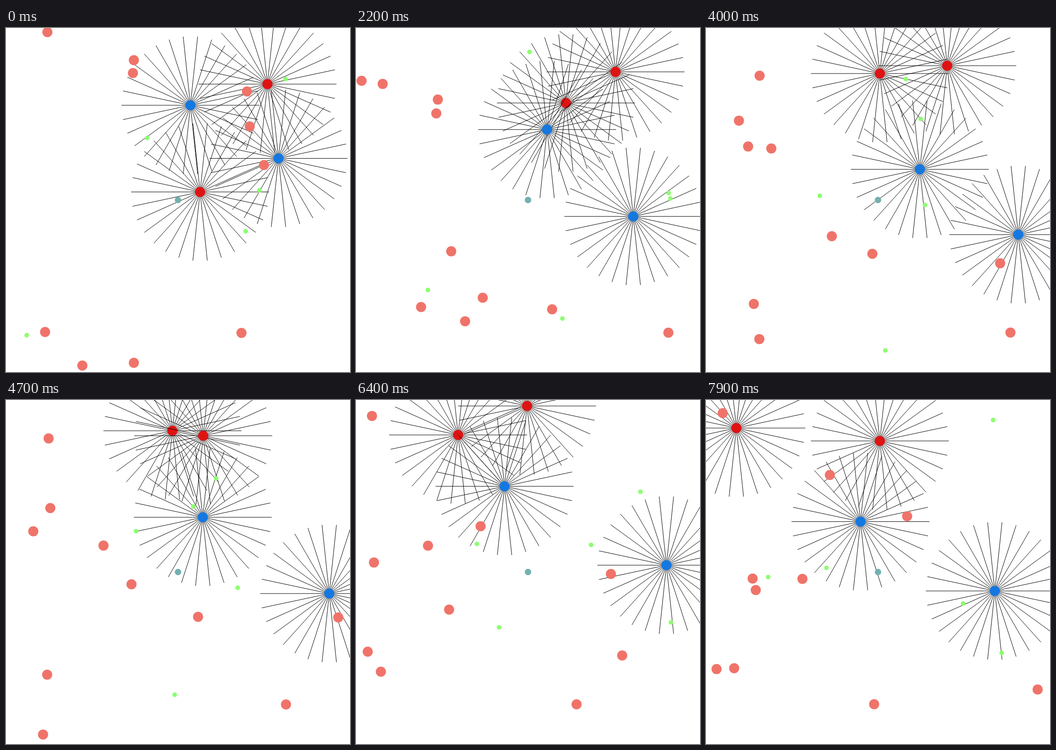
An HTML page with a canvas for the animation above (8000 ms loop, 748x748 px).

```html
<!DOCTYPE html>
<html lang="en">
<head>
<meta charset="utf-8">
<title>Drifting dots</title>
<style>
  html, body { margin: 0; width: 100%; height: 100%; overflow: hidden; background: #fff; }
  canvas { display: block; }
</style>
</head>
<body>
<canvas id="stage" width="748" height="748"></canvas>
<script>
const SIZE = 748, MID = SIZE / 2, STEP = 100, STEPS = 80, SUB = 8;
const RED = '#df1313', BLUE = '#1478e0', TEAL = '#74b0b0';
const PINK = { r: 11, fill: '#f07369', lo: 10, hi: 739 };
const GREEN = { r: 5, fill: '#8cff70', lo: 5, hi: 744 };
const SHIELD = 74; // unseen round wall about the teal dot
const ctx = document.getElementById('stage').getContext('2d');

// Stars glide through a few points, all at the same steps
const KEYS = [0, 14, 30, 40, 55, 64, 79];
const stars = [
  { fill: RED, x: [422, 458, 440, 378, 356, 372, 378], y: [356.5, 224.5, 114.5, 99, 29, 13, 89] },
  { fill: RED, x: [568.5, 549.5, 574.5, 524.5, 310, 222, 66], y: [122, 98, 94, 82, 75, 76, 61] },
  { fill: BLUE, x: [401, 361, 476, 465, 377, 323, 336], y: [168, 146, 302.5, 307.3, 191.5, 187.7, 264.4] },
  { fill: BLUE, x: [592.5, 566.5, 649, 679, 719, 675, 628], y: [283.5, 321.5, 490, 449.3, 389.4, 359.2, 415.2] }
];

// Hermite curve with averaged slopes at the points
function glide(values, t) {
  const last = KEYS.length - 1;
  let i = 0;
  while (i < last - 1 && KEYS[i + 1] <= t) i++;
  const slope = k => {
    const a = Math.max(k - 1, 0), b = Math.min(k + 1, last);
    return (values[b] - values[a]) / (KEYS[b] - KEYS[a]);
  };
  const span = KEYS[i + 1] - KEYS[i], u = (t - KEYS[i]) / span, w = 1 - u;
  return values[i] * (1 + 2 * u) * w * w + values[i + 1] * (1 + 2 * w) * u * u +
    span * u * w * (slope(i) * w - slope(i + 1) * u);
}

function bounce(p, v, lo, hi) {
  if (p < lo && v < 0) return [2 * lo - p, -v];
  if (p > hi && v > 0) return [2 * hi - p, -v];
  return [p, v];
}

// Moves a dot in small steps off the walls and the shield, noting its place at each step
const dots = [];
function launch(kind, x, y, vx, vy, from = 0, to = STEPS) {
  const track = [];
  for (let i = 0; i < (to - from) * SUB; i++) {
    if (i % SUB === 0) track.push([x, y]);
    [x, vx] = bounce(x + vx / SUB, vx, kind.lo, kind.hi);
    [y, vy] = bounce(y + vy / SUB, vy, kind.lo, kind.hi);
    const d = Math.hypot(x - MID, y - MID), nx = (x - MID) / d, ny = (y - MID) / d;
    const inward = vx * nx + vy * ny;
    if (d < SHIELD + kind.r && inward < 0) {
      vx -= 2 * inward * nx;
      vy -= 2 * inward * ny;
    }
  }
  dots.push({ kind, track, from });
}

launch(GREEN, 45, 668, 5.06, 11.38, 0, 58);
launch(GREEN, 521, 442, -3.28, 8.62);
launch(GREEN, 307, 239, 3.19, -8.5);
launch(GREEN, 608, 111, 3.27, 11.27, 0, 34);
launch(GREEN, 551, 353, 11.52, .8);
launch(PINK, 512, 663, 7.6, -.02);
launch(PINK, 278, 728, -.11, 7.43);
launch(PINK, 166, 734, 11.84, -5.56);
launch(PINK, 85, 661, 6.92, 8.15);
launch(PINK, 278, 70, -10, -7.8);
launch(PINK, 90, 9, -3.54, 4.81);
launch(PINK, 276, 98, -4.61, 3.99);
launch(PINK, 524, 138, 1, -6, 0, 17);
launch(PINK, 530, 214, 0, 0, 0, 3);
launch(PINK, 561, 298, 0, 0, 0, 6);

// Eaten dots come back elsewhere
launch(GREEN, 616, 262, .4, -10.4, 58);
launch(GREEN, 518, 169, -8.51, 4.8, 34);
launch(PINK, 195, 170, -3.41, -2.88, 17);
launch(PINK, 181, 614, -2.08, -.38, 3);
launch(PINK, 288, 316, -5.06, 10.6, 6);

const rays = new Path2D();
for (let i = 0; i < 30; i++) {
  const a = i * Math.PI / 15;
  rays.moveTo(0, 0);
  rays.lineTo(150 * Math.cos(a), 150 * Math.sin(a));
}

function disc(x, y, r, fill) {
  ctx.fillStyle = fill;
  ctx.beginPath();
  ctx.arc(x, y, r, 0, 2 * Math.PI);
  ctx.fill();
}

function draw() {
  const t = Math.floor(performance.now() / STEP) % STEPS;
  ctx.fillStyle = '#fff';
  ctx.fillRect(0, 0, SIZE, SIZE);
  for (const star of stars) {
    const x = glide(star.x, t), y = glide(star.y, t);
    ctx.save();
    ctx.translate(x, y);
    ctx.stroke(rays);
    ctx.restore();
    disc(x, y, 11, star.fill);
  }
  disc(MID, MID, 7, TEAL);
  for (const { kind, track, from } of dots) {
    const spot = track[t - from];
    if (spot) disc(...spot, kind.r, kind.fill);
  }
  requestAnimationFrame(draw);
}
draw();
</script>
</body>
</html>
```
